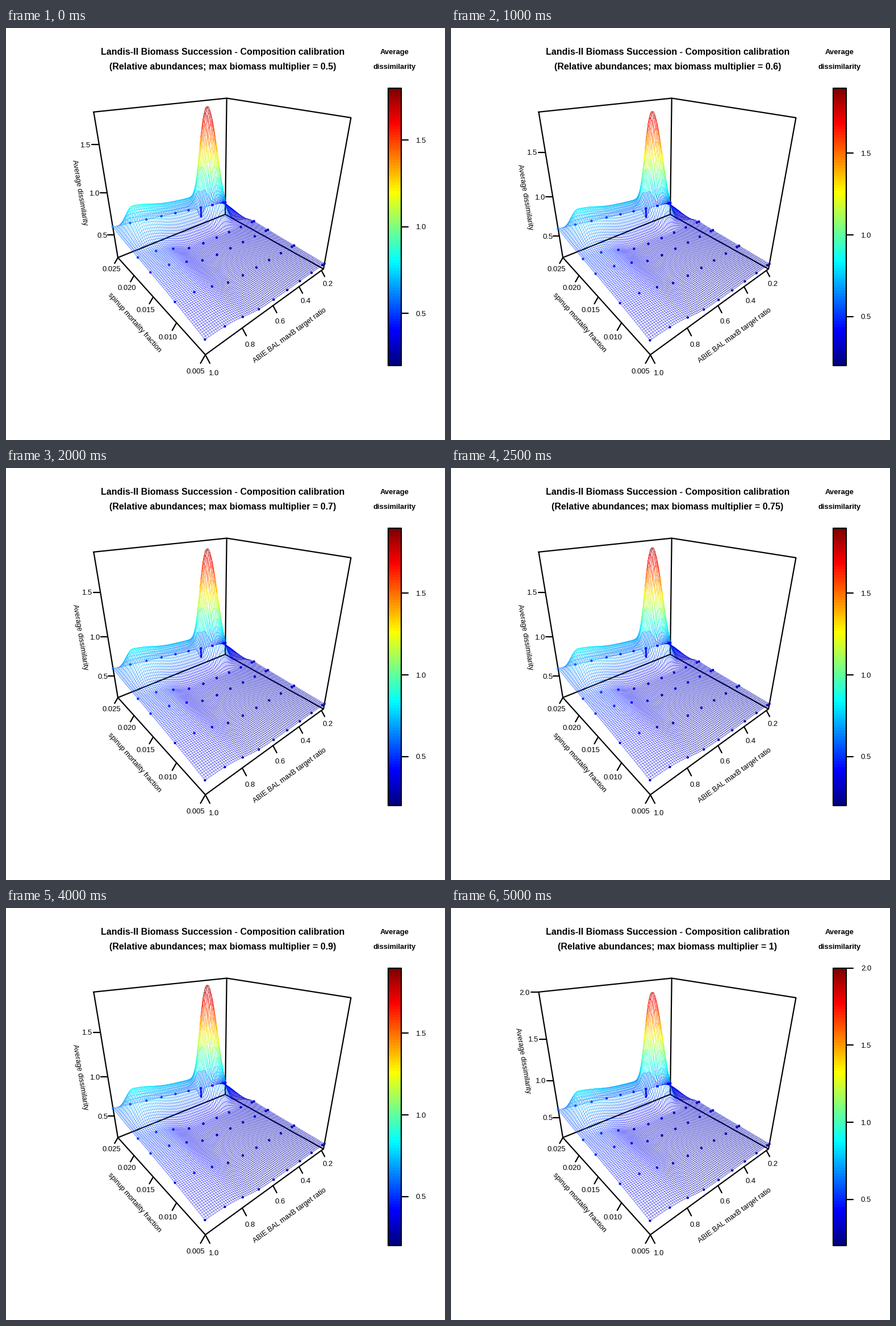
A matplotlib script that plays this animation: 773 by 725 pixels, repeating every 5.5 s.

```python
import numpy as np
import matplotlib.pyplot as plt
from matplotlib.animation import FuncAnimation
from matplotlib.collections import LineCollection
from matplotlib.colors import LinearSegmentedColormap

W, H, DPI = 773, 725, 100
PX = 72 / DPI
STEPS = 11
GRID = 80
FLOOR = 0.2
X0, X1 = 0.18, 1.0
Y0, Y1 = 0.005, 0.025
PEAK_X, DIP = 0.4, 0.15

plt.rcParams["font.family"] = "Liberation Sans"
JET = LinearSegmentedColormap.from_list("jet_steps", [
    "#00007F", "#0000FF", "#007FFF", "#00FFFF", "#7FFF7F",
    "#FFFF00", "#FF7F00", "#FF0000", "#7F0000"], N=100)

# Perspective camera for the unit box: columns are ratio, mortality, height, 1
CAMERA = np.array([[435.5, -60.84, -107.3, 351.0],
                   [21.5, 20.05, -420.0, 575.0],
                   [0.4069, 0.4729, -0.2887, 1.0]])


def project(x, y, z, top):
    """Screen position and depth of a data point."""
    box = np.broadcast_arrays((X1 - x) / (X1 - X0), (y - Y0) / (Y1 - Y0),
                              (z - FLOOR) / (top - FLOOR), 1.0)
    u, v, w = np.tensordot(CAMERA, np.stack(box), 1)
    return u / w, v / w, w


def smoothstep(t):
    t = np.clip(t, 0, 1)
    return t * t * (3 - 2 * t)


def bell(d, width):
    return np.exp(-(d / width) ** 2)


def top_of(k):
    return 1.8 if k == 0 else 1.9 if k < 9 else 2.0


def base(x, y, k):
    """Slope through the sampled points: a step in ratio, a rise at the back."""
    b = (y - Y0) / (Y1 - Y0)
    step = (0.095 + 0.22 * b - 0.13 * b ** 2) / (1 + np.exp((0.785 - x) / 0.045))
    back = 0.395 + 0.25 * (x - X0)
    blend = b ** 6
    z = (1 - blend) * (0.27 + 0.09 * b + step) + blend * back
    return z * (1 + 0.0015 * k)


def surface(x, y, k):
    """Base plus the ridge and peak that swell behind the fourth sample row."""
    t = np.clip((y - 0.018) / (Y1 - 0.018), 0, 1)
    swell = t ** 2.3 * (1 - t) / 0.132
    peak = 1.768 + 0.155 * (1 - np.exp(-k / 6.6))
    ridge = 0.3 * smoothstep((X1 - x) / 0.1) * smoothstep((x - 0.17) / 0.22)
    ridge = ridge - 0.17 * bell(x - X0, 0.015)
    spike = (peak - 0.7) * bell(x - PEAK_X, 0.055)
    dip = DIP * bell(x - PEAK_X, 0.022) * bell(y - Y1, 0.0004)
    return base(x, y, k) + swell * (ridge + spike) - dip


def pairs(a):
    """Neighbours along both grid directions."""
    rows = np.stack([a[:, :-1], a[:, 1:]], axis=2)
    cols = np.stack([a[:-1], a[1:]], axis=2)
    return np.concatenate([s.reshape(-1, 2, *a.shape[2:]) for s in (rows, cols)])


mesh_x, mesh_y = np.meshgrid(np.linspace(X0, X1, GRID + 1),
                             np.linspace(Y0, Y1, GRID + 1))
dot_x, dot_y = np.meshgrid([X0, *np.arange(2, 11) / 10],
                           [Y0, 0.010, 0.015, 0.018, Y1])

fig = plt.figure(figsize=(W / DPI, H / DPI), dpi=DPI, facecolor="white")
ax = fig.add_axes([0, 0, 1, 1])
ax.axis("off")


def line(px, py, width=2.2, **kw):
    kw = {"color": "black", "solid_capstyle": "round",
          "solid_joinstyle": "round", "zorder": 1, **kw}
    return ax.plot(px, py, lw=width * PX, **kw)[0]


def label(x, y, s="", size=13.1, **kw):
    return ax.text(x, y, s, fontsize=size * PX, ha="center", **kw)


def digits(x, y, s=""):
    return label(x, y + 4.7, s)


def slanted(x, y, s, angle):
    return label(x, y, s, 12.75, va="center_baseline",
                 rotation=angle, rotation_mode="anchor")


def tick(x, y, w, text, dx, dy, tx, ty):
    line([x, x + dx / w], [y, y + dy / w])
    digits(x + tx / w, y + ty / w, text)


# Box
A, B, C, D = (project(x, y, 0, 1 + FLOOR * 0)[:2] if False else
              project(x, y, FLOOR, 1.8)[:2]
              for x, y in ((X1, Y1), (X1, Y0), (X0, Y0), (X0, Y1)))
A2, C2, D2 = (project(x, y, 1.8, 1.8)[:2]
              for x, y in ((X1, Y1), (X0, Y0), (X0, Y1)))
for path in ([A2, A, B, C, C2, D2, A2], [A, D, C], [D, D2]):
    line(*zip(*path))

for r in np.arange(1, 6) / 5:
    tick(*project(r, Y0, FLOOR, 1.8), f"{r:.1f}", 8, 15, 15, 31.5)
for m in np.arange(1, 6) / 200:
    tick(*project(X1, m, FLOOR, 1.8), f"{m:.3f}", -8.5, 15, -17, 28)

slanted(498.5, 540, "ABIE.BAL maxB target ratio", 36)
slanted(227.5, 518, "spinup mortality fraction", -48.5)
z_name = slanted(131, 290, "Average dissimilarity", -80.6)

# Titles
label(382, 47, "Landis-II Biomass Succession - Composition calibration",
      16, weight="bold")
title = label(381.5, 73, size=16, weight="bold")
label(684.5, 45.5, "Average", 13, weight="bold")
label(684.5, 71.5, "dissimilarity", 13, weight="bold")

# Colour key
LEFT, RIGHT, TOP, BOTTOM = 672.5, 696, 105.5, 594
ax.imshow(np.linspace(1, 0, 100)[:, None], cmap=JET, aspect="auto",
          extent=(LEFT, RIGHT, BOTTOM, TOP), interpolation="nearest", zorder=0)
line([LEFT, RIGHT, RIGHT, LEFT, LEFT], [TOP, TOP, BOTTOM, BOTTOM, TOP])

LEVELS = (0.5, 1.0, 1.5, 2.0)
z_marks = [(line([], []), digits(0, 0, f"{z:.1f}"),
            line([], []), digits(731, 0, f"{z:.1f}")) for z in LEVELS]

mesh = ax.add_collection(LineCollection([], linewidths=0.5 * PX, zorder=2))
dots = ax.scatter([], [], s=(4.4 * PX) ** 2, linewidths=0, zorder=4)
drop = line([], [], 2.5, solid_capstyle="butt", zorder=4)

ax.set_xlim(0, W)
ax.set_ylim(H, 0)


def update(k):
    top = top_of(k)

    def shade(z):
        return JET((z - FLOOR) / (top - FLOOR))

    title.set_text("(Relative abundances; max biomass multiplier = "
                   f"{round(0.5 + 0.05 * k, 2):g})")

    z = surface(mesh_x, mesh_y, k)
    u, v, _ = project(mesh_x, mesh_y, z, top)
    mesh.set_segments(pairs(np.stack([u, v], axis=-1)))
    mesh.set_color(shade(pairs(z).mean(axis=1)))

    z = base(dot_x, dot_y, k)
    u, v, _ = project(dot_x, dot_y, z, top)
    dots.set_offsets(np.column_stack([u.ravel(), v.ravel()]))
    dots.set_facecolor(shade(z.ravel()))

    z = base(PEAK_X, Y1, k) - np.array([0, DIP])
    drop.set_data(*project(PEAK_X, Y1, z, top)[:2])
    drop.set_color(shade(z.mean()))

    shown = [z for z in LEVELS if z <= top]
    for z, (mark, num, key, key_num) in zip(LEVELS, z_marks):
        x, y, w = project(X1, Y1, z, top)
        mark.set_data([x, x - 15.8 / w], [y, y])
        num.set_position((x - 29.3 / w, y + 4.7))
        ky = BOTTOM + (TOP - BOTTOM) * (z - FLOOR) / (top - FLOOR)
        key.set_data([RIGHT, 708], [ky, ky])
        key_num.set_y(ky + 4.7)
        for part in (mark, num, key, key_num):
            part.set_visible(z in shown)
    x, y, _ = project(X1, Y1, np.mean(shown), top)
    z_name.set_position((x - 47, y))
    return []


anim = FuncAnimation(fig, update, frames=STEPS, interval=500,
                     init_func=lambda: update(0), repeat=True,
                     repeat_delay=0, blit=False)
plt.show()
```
